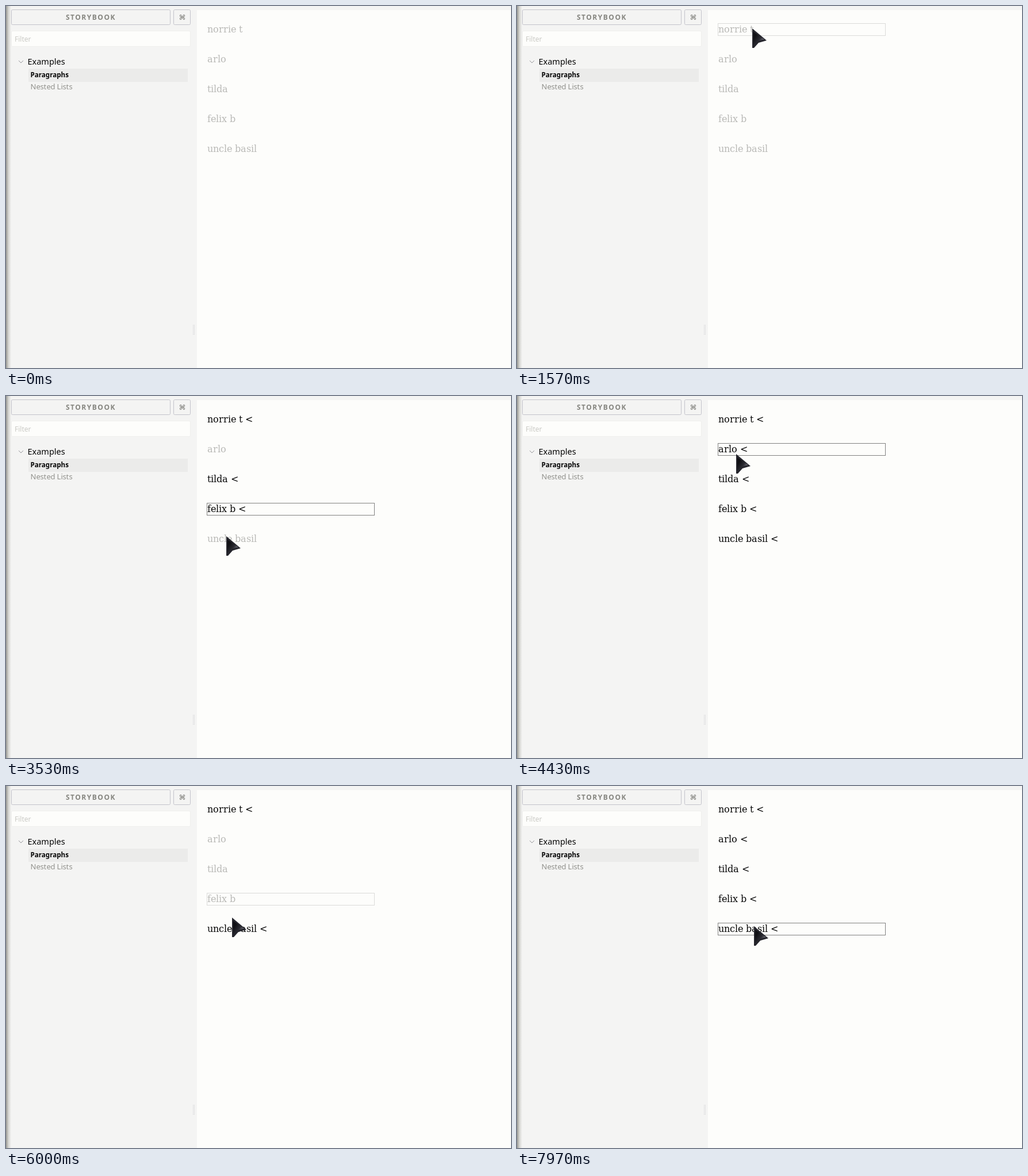
An HTML page with a canvas for the animation above (8 s loop, 878x630 px).

```html
<!DOCTYPE html>
<html lang="en">
<head>
<meta charset="utf-8">
<title>Selectable paragraphs</title>
<style>
  html, body { margin: 0; width: 100%; height: 100%; overflow: hidden; background: #fdfdfb; }
  canvas { display: block; }
</style>
</head>
<body>
<canvas id="stage" width="878" height="630"></canvas>
<script>
const ctx = document.getElementById('stage').getContext('2d');
const LOOP = 8000;
const SANS = '"Noto Sans", "Open Sans", sans-serif';
const SERIF = '"DejaVu Serif", serif';
const INK = '#060606';
const MUTED = '#b9b9b6';
const BORDER = '#c3c3cb';
const SIDE = '#f4f4f3';
const PAGE = '#fdfdfb';
const ROW_TOP = 30;
const ROW_STEP = 52;

const names = ['norrie t', 'arlo', 'tilda', 'felix b', 'uncle basil'];

// Pointer stops: time, x, y, and what a click there does
const stops = [
  [0, -40, 200],
  [600, 400, 44, 'toggle'],
  [1050, 418, 215],
  [1540, 409, 38, 'toggle'],
  [2080, 385, 135, 'toggle'],
  [2750, 392, 45, 'toggle'],
  [3180, 383, 198, 'toggle'],
  [3600, 383, 248, 'toggle'],
  [3780, 388, 290],
  [4080, 384, 52],
  [4400, 381, 100, 'toggle'],
  [5000, 393, 224],
  [5400, 391, 200, 'range'],
  [6040, 393, 229, 'clear'],
  [6750, 421, 44, 'toggle'],
  [7170, 418, 211],
  [7340, 415, 264, 'range'],
  [7680, 406, 88, 'range'],
  [7950, 412, 244, 'range']
];

function pointerAt(t) {
  const i = stops.findLastIndex(s => s[0] <= t);
  const [t0, x0, y0] = stops[i];
  const [t1, x1, y1] = stops[i + 1] || [LOOP, x0, y0];
  const u = (t - t0) / (t1 - t0);
  const k = u * u * (3 - 2 * u);
  return [Math.round(x0 + (x1 - x0) * k), Math.round(y0 + (y1 - y0) * k)];
}

// Replays the clicks made so far
function listAt(t) {
  const selected = names.map(() => false);
  let focus = -1;
  for (const [time, , y, action] of stops) {
    if (time > t || !action) continue;
    if (action === 'clear') {
      selected.fill(false);
      continue;
    }
    const row = Math.round((y - ROW_TOP - 11) / ROW_STEP);
    const from = action === 'range' ? focus : row;
    selected.fill(!selected[row], Math.min(from, row), Math.max(from, row) + 1);
    focus = row;
  }
  return { selected, focus };
}

function fill(color, x, y, w, h) {
  ctx.fillStyle = color;
  ctx.fillRect(x, y, w, h);
}

function frame(color, x, y, w, h, radius = 0) {
  ctx.strokeStyle = color;
  ctx.lineWidth = 1;
  ctx.beginPath();
  ctx.roundRect(x + 0.5, y + 0.5, w - 1, h - 1, radius);
  ctx.stroke();
}

function text(str, x, y, font, color, spacing = 0) {
  ctx.font = font;
  ctx.fillStyle = color;
  ctx.letterSpacing = spacing + 'px';
  ctx.fillText(str, x, y);
  ctx.letterSpacing = '0px';
}

// Whole-pixel advances, as hinted text has
function hintedText(str, x, y, font, color) {
  ctx.font = font;
  ctx.fillStyle = color;
  for (const ch of str) {
    ctx.fillText(ch, x, y);
    x += Math.round(ctx.measureText(ch).width);
  }
}

function drawSidebar() {
  fill(SIDE, 0, 0, 878, 630);
  const edge = ctx.createLinearGradient(0, 0, 9, 0);
  edge.addColorStop(0, '#979792');
  edge.addColorStop(0.45, '#d3d3cf');
  edge.addColorStop(1, SIDE);
  fill(edge, 0, 0, 9, 630);

  frame(BORDER, 9, 6, 277, 27, 2);
  frame(BORDER, 291, 6, 30, 27, 2);
  text('STORYBOOK', 104, 24, `bold 12px ${SANS}`, '#85857f', 1.5);
  ctx.textAlign = 'center';
  text('⌘', 306.5, 24, '12px "DejaVu Sans", sans-serif', '#74746f');
  ctx.textAlign = 'left';

  fill(PAGE, 10, 44, 310, 26);
  frame('#efefed', 9, 43, 312, 28, 2);
  text('Filter', 15, 62, `12px ${SANS}`, '#cacac5');

  ctx.strokeStyle = '#96969a';
  ctx.beginPath();
  ctx.moveTo(22, 95);
  ctx.lineTo(26, 99);
  ctx.lineTo(30, 95);
  ctx.stroke();

  text('Examples', 37.5, 102, `14.5px ${SANS}`, INK);
  fill('#ebebea', 39, 109, 277, 23);
  text('Paragraphs', 42.5, 124, `bold 11.6px ${SANS}`, INK);
  hintedText('Nested Lists', 42.5, 145, `13px ${SANS}`, '#91918c');

  for (let y = 555; y < 573; y += 2) {
    fill('#cfcfd2', 325, y, 1, 1);
    fill('#cfcfd2', 327, y, 1, 1);
  }
}

function drawList({ selected, focus }) {
  fill(PAGE, 332, 7, 546, 623);
  names.forEach((name, i) => {
    const top = ROW_TOP + ROW_STEP * i;
    const color = selected[i] ? INK : MUTED;
    hintedText(selected[i] ? name + ' <' : name, 350, top + 16, `16px ${SERIF}`, color);
    if (i === focus) {
      ctx.setLineDash([1, 1]);
      frame(color, 349, top, 292, 22);
      ctx.setLineDash([]);
    }
  });
}

function polygon(color, points) {
  ctx.fillStyle = color;
  ctx.beginPath();
  points.forEach(([x, y]) => ctx.lineTo(x, y));
  ctx.closePath();
  ctx.fill();
}

function drawPointer(x, y) {
  ctx.save();
  ctx.translate(x, y);
  polygon('#25252c', [[0, 0], [0, 34], [3, 34], [11, 25], [25, 21]]);
  const sheen = ctx.createLinearGradient(5, 14, 20, 24);
  sheen.addColorStop(0, '#101014');
  sheen.addColorStop(0.5, '#2a2a31');
  sheen.addColorStop(1, '#85858f');
  polygon(sheen, [[2, 6], [2, 29], [10, 22], [21, 19]]);
  ctx.restore();
}

function draw(t) {
  drawSidebar();
  drawList(listAt(t));
  drawPointer(...pointerAt(t));
}

const start = performance.now();
function tick() {
  draw((performance.now() - start) % LOOP);
  requestAnimationFrame(tick);
}
tick();
</script>
</body>
</html>
```
